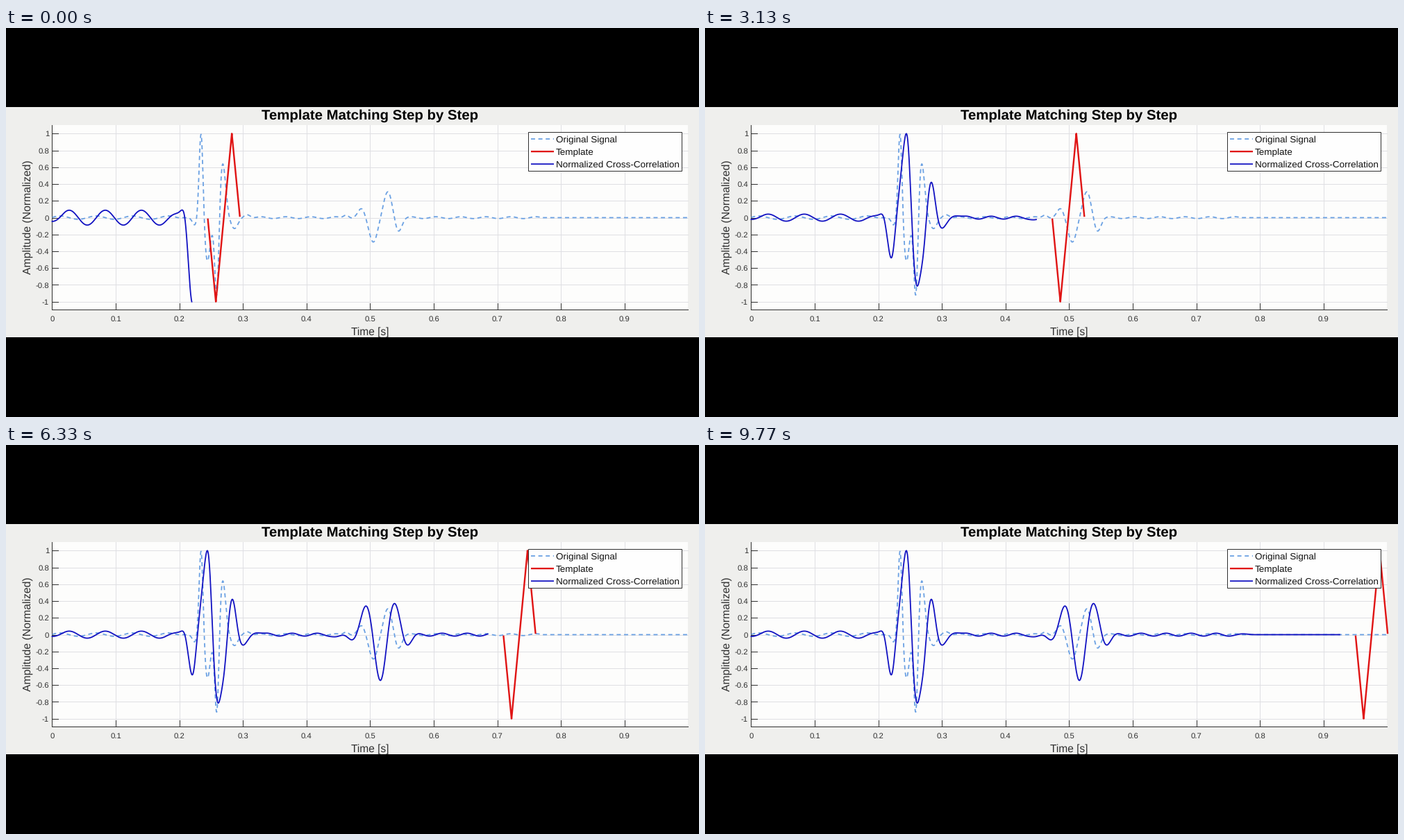
A matplotlib script for the animation above (9810 ms loop, 998 by 561 pixels).

```python
import numpy as np
import matplotlib.pyplot as plt
from matplotlib.animation import FuncAnimation
from matplotlib.patches import Rectangle

W, H, DPI = 998, 561, 100
FRAMES, LOOP_MS = 294, 9810
PT = 72 / DPI                      # points per pixel
LEFT, RIGHT, TOP, BOTTOM = 66.5, 982, 140, 406
X_UNIT, Y_ZERO, Y_UNIT = 916, 273.5, 121.2
DARK, GRID = "#303030", "#dfdfe3"
SKY, RED, BLUE = "#6ba1e3", "#e01414", "#1111c2"
DASH = (0, (3.3, 2.6))

SPAN = 46                          # template length in pixels
FIRST, LAST, SPEED = 290.7, 937, 2.253
STEP = .5

# Gaussian pulses: centre x, height, width
BEAT = [(272, -.09, 5), (281, 1.05, 4), (290, -.52, 6), (303.7, -1.03, 4.2),
        (311.8, .66, 6.2), (329, -.13, 7), (347, .035, 6)]
ECHO = [(490, .04, 5), (512, .1, 7), (529, -.28, 8.5), (550, .3, 8.5),
        (565, -.16, 7)]

plt.rcParams["font.family"] = "Liberation Sans"
plt.rcParams["text.hinting"] = "none"


def ripple(x, start, end, peak, period, height):
    wave = height * np.cos(2 * np.pi * (x - peak) / period)
    return np.where((x > start) & (x < end), wave, 0)


def signal_at(x):
    pulses = sum(a * np.exp(-((x - c) / w) ** 2) for c, a, w in BEAT + ECHO)
    return (pulses + ripple(x, 0, 247, 182, 52, .02)
            + ripple(x, 358, 772, 655, 36, .011))


def template_at(u):
    """One triangle wave, down first, for u from 0 to 1."""
    return np.interp(u, [0, .25, .75, 1], [-.02, -1, 1, .02])


def to_y(v):
    return Y_ZERO - Y_UNIT * v


fig = plt.figure(figsize=(W / DPI, H / DPI), dpi=DPI, facecolor="black")
ax = fig.add_axes([0, 0, 1, 1])
ax.set(xlim=(0, W), ylim=(H, 0))
ax.axis("off")


def box(x0, y0, x1, y1, color, edge="none", z=0):
    ax.add_patch(Rectangle((x0, y0), x1 - x0, y1 - y0, facecolor=color,
                           edgecolor=edge, lw=PT, zorder=z))


def line(x, y, color, width=1, z=1, **kw):
    return ax.plot(x, y, color=color, lw=width * PT, zorder=z, **kw)[0]


def label(x, y, text, size, color=DARK, ha="center", **kw):
    ax.text(x, y, text, fontsize=size * PT, color=color, ha=ha,
            va="baseline", zorder=9, **kw)


def draw_axes():
    box(0, 114, W, 446, "#efefed")
    box(LEFT, TOP, RIGHT, BOTTOM, "#fdfdfc")
    for k in range(10):
        x = LEFT + X_UNIT * k / 10
        if k:
            line([x, x], [TOP, BOTTOM], GRID)
        line([x, x], [BOTTOM - 9, BOTTOM], DARK, z=2)
        label(x, 423, f"{k / 10:g}", 11.4)
    for k in range(-5, 6):
        y = to_y(k / 5)
        line([LEFT, RIGHT], [y, y], GRID)
        line([LEFT, LEFT + 9], [y, y], DARK, z=2)
        label(62, y + 4, f"{k / 5:g}", 11.4, ha="right")
    line([LEFT, LEFT, RIGHT], [TOP, BOTTOM, BOTTOM], DARK, z=2)
    label(524.2, 132, "Template Matching Step by Step", 20.35, "black",
          weight="bold")
    label(524.5, 442.5, "Time [s]", 15.5)
    label(35.5, 273, "Amplitude (Normalized)", 15.7, rotation=90,
          rotation_mode="anchor")


def draw_legend():
    box(752.5, 149.5, 973, 205.5, "#fefefe", DARK, 7)
    rows = [("Original Signal", SKY, 1.8, DASH), ("Template", RED, 2.3, "-"),
            ("Normalized Cross-Correlation", BLUE, 1.8, "-")]
    for k, (text, color, width, style) in enumerate(rows):
        y = 160 + 18.1 * k
        line([756, 789], [y, y], color, width, 8, ls=style, snap=False,
             dash_capstyle="butt", solid_capstyle="butt")
        label(792, y + 5, text, 13.48, "#101010", ha="left")


draw_axes()
draw_legend()

xs = np.arange(LEFT, RIGHT + STEP, STEP)
signal = signal_at(xs)
shape_x = np.arange(0, SPAN + STEP, STEP)
shape = template_at(shape_x / SPAN)
corr = np.convolve(signal, shape, "same")

line(xs, to_y(signal), SKY, 1.8, 3, ls=DASH, dash_capstyle="butt")
template = line([], [], RED, 2.4, 4, solid_joinstyle="round")
trace = line([], [], BLUE, 1.8, 5, solid_joinstyle="round")


def update(i):
    start = min(FIRST + SPEED * i, LAST)
    template.set_data(start + shape_x, to_y(shape))
    # The trace trails half a template behind, scaled by its peak so far
    n = np.searchsorted(xs, start - SPAN / 2, side="right")
    trace.set_data(xs[:n], to_y(corr[:n] / np.abs(corr[:n]).max()))
    return template, trace


anim = FuncAnimation(fig, update, frames=FRAMES, interval=LOOP_MS / FRAMES,
                     repeat=True, repeat_delay=0, blit=False)
plt.show()
```
